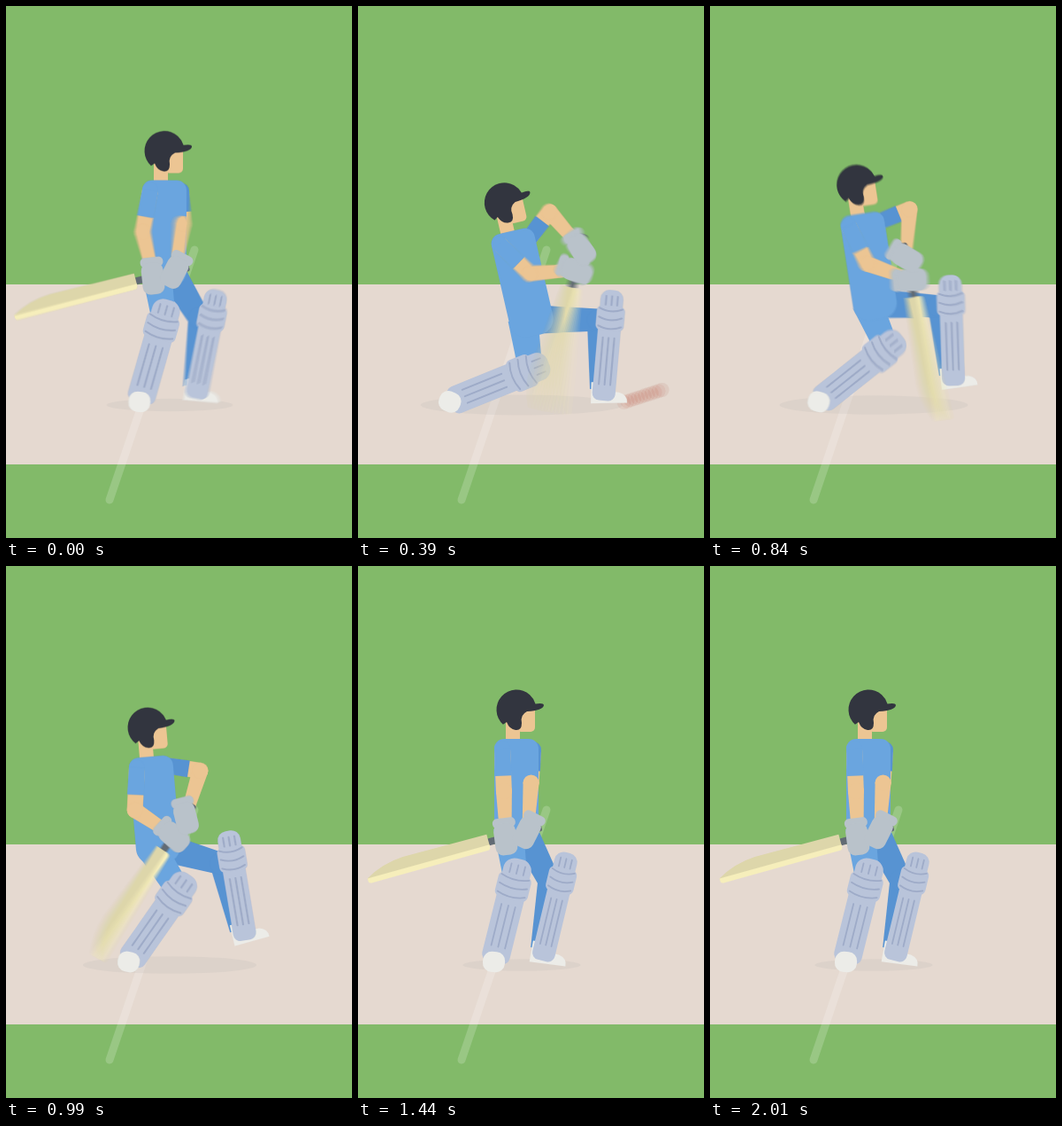
Animation, 391 px wide and 600 px high, one loop 2250 ms. Source, as an HTML page with a canvas:

```html
<!DOCTYPE html>
<html lang="en">
<head>
<meta charset="utf-8">
<title>Batsman</title>
<style>
html, body { margin: 0; width: 100%; height: 100%; overflow: hidden; background: #82ba69; }
canvas { display: block; width: 391px; height: 600px; }
</style>
</head>
<body>
<canvas id="stage" width="391" height="600"></canvas>
<script>
const ctx = document.getElementById('stage').getContext('2d');
const sum = document.createElement('canvas');
sum.width = 391;
sum.height = 600;
const ink = sum.getContext('2d');

const LOOP = 2250, STEP = 30, SHUTTER = 18, SAMPLES = 12, REST = 1400;
const RAD = Math.PI / 180;
const TORSO = 121, NEAR_PAD = 120, FAR_PAD = 125, BLADE = 143;
const C = {
  grass: '#82ba69', pitch: '#e5d9d0', shirt: '#6aa5df', shade: '#5793d2',
  skin: '#ecc593', helmet: '#32353f', glove: '#b9c2ca', pad: '#b9c4da',
  seam: '#9eabc8', shoe: '#ecece8', blade: '#ddd6aa', edge: '#f6eebb',
  grip: '#626b74', ball: '#ba503d'
};

// Smooth monotone curve through rows of [time, values...], at rest at both ends
function curve(rows) {
  const last = rows.length - 1;
  const slope = (i, d) => (rows[i + 1][d] - rows[i][d]) / (rows[i + 1][0] - rows[i][0]);
  function tangent(i, d) {
    if (i === 0 || i === last) return 0;
    const a = slope(i - 1, d), b = slope(i, d);
    return a * b <= 0 ? 0 : 2 * a * b / (a + b);
  }
  return t => {
    const time = Math.max(rows[0][0], Math.min(rows[last][0], t));
    let i = 0;
    while (i < last - 1 && time > rows[i + 1][0]) i++;
    const h = rows[i + 1][0] - rows[i][0], u = (time - rows[i][0]) / h, v = 1 - u;
    return rows[i].slice(1).map((from, k) => {
      const d = k + 1, to = rows[i + 1][d];
      return v * v * (1 + 2 * u) * from + u * u * (3 - 2 * u) * to +
        h * u * v * (v * tangent(i, d) - u * tangent(i + 1, d));
    });
  };
}

// Neck x, y, tilt; lower hand x, y; near foot x, shin lean; far foot x, y, shin lean
const stance = [179, 196, 0, 167, 306, 154, 14, 208, 445, 13.5];
const poseAt = curve([
  [-40, ...stance],
  [180, 179, 222, 1, 160, 298, 117, 44, 280, 419, -12.5],
  [390, 173, 255, -13, 246, 298, 104, 68, 277, 445, 5],
  [630, 184, 258, -13, 277, 316, 104, 70, 278, 441, 10.5],
  [990, 163, 216, -5, 189, 304, 139, 35, 271, 422, -9.5],
  [REST, ...stance]
]);
const batAt = curve([[-40, 164.5], [180, 182], [260, 190], [390, 103], [450, 46],
  [630, 43.5], [990, 123.5], [1080, 160], [1300, 164.5]]);

const move = (o, deg, x, y) => {
  const c = Math.cos(deg * RAD), s = Math.sin(deg * RAD);
  return [o[0] + x * c - y * s, o[1] + x * s + y * c];
};
const mix = (a, b, k) => [a[0] + (b[0] - a[0]) * k, a[1] + (b[1] - a[1]) * k];

// Middle joint of a two-part limb; side picks the way it bends
function joint(a, b, la, lb, side) {
  const d = Math.hypot(b[0] - a[0], b[1] - a[1]);
  const along = d < la + lb ? (la * la - lb * lb + d * d) / (2 * d) : d * la / (la + lb);
  const out = Math.sqrt(Math.max(0, la * la - along * along)) * (d < la + lb ? side : 0);
  return move(a, Math.atan2(b[1] - a[1], b[0] - a[0]) / RAD, along, out);
}

function place([x, y], deg, draw) {
  ctx.save();
  ctx.translate(x, y);
  ctx.rotate(deg * RAD);
  draw();
  ctx.restore();
}

function box(x, y, w, h, r, color) {
  ctx.beginPath();
  ctx.roundRect(x, y, w, h, r);
  ctx.fillStyle = color;
  ctx.fill();
}

function oval(x, y, rx, ry, color) {
  ctx.beginPath();
  ctx.ellipse(x, y, rx, ry, 0, 0, 2 * Math.PI);
  ctx.fillStyle = color;
  ctx.fill();
}

// Tapered bar from a to b
function limb(a, b, wa, wb, color) {
  const len = Math.hypot(b[0] - a[0], b[1] - a[1]);
  place(a, Math.atan2(b[1] - a[1], b[0] - a[0]) / RAD, () => {
    ctx.beginPath();
    ctx.moveTo(0, -wa / 2);
    ctx.lineTo(len, -wb / 2);
    ctx.lineTo(len, wb / 2);
    ctx.lineTo(0, wa / 2);
    ctx.fillStyle = color;
    ctx.fill();
  });
}

function upperArm(shoulder, elbow, color) {
  limb(shoulder, elbow, 18, 18, C.skin);
  oval(...elbow, 9, 9, C.skin);
  oval(...shoulder, 9, 9, color);
  limb(shoulder, mix(shoulder, elbow, 0.64), 18, 19, color);
}

function foreArm(elbow, hand) {
  limb(elbow, hand, 18, 13, C.skin);
  oval(...elbow, 9, 9, C.skin);
}

function field() {
  ctx.fillStyle = C.grass;
  ctx.fillRect(0, 0, 391, 600);
  ctx.fillStyle = C.pitch;
  ctx.fillRect(0, 314, 391, 203);
  ctx.strokeStyle = 'rgba(255,255,255,.18)';
  ctx.lineWidth = 9;
  ctx.lineCap = 'round';
  ctx.beginPath();
  ctx.moveTo(213, 275);
  ctx.lineTo(117, 557);
  ctx.stroke();
}

function head() {
  box(-12, 10, 16, 30, 2, C.skin);
  box(0, -4, 21, 29, 5, C.skin);
  ctx.beginPath();
  ctx.arc(0, 0, 22.5, 132 * RAD, -17 * RAD);
  ctx.quadraticCurveTo(31, -8, 31, -5);
  ctx.quadraticCurveTo(30, 1, 12, 2);
  ctx.quadraticCurveTo(4, 6, 6, 15);
  ctx.quadraticCurveTo(6, 24, -1, 23);
  ctx.quadraticCurveTo(-8, 22, -11, 14);
  ctx.closePath();
  ctx.fillStyle = C.helmet;
  ctx.fill();
}

// Shin pad, foot end at the origin, pointing up
function pad(len, half) {
  const top = -len, roll = top + 18;
  box(-half, top, 2 * half, len, [half * 0.8, half * 0.8, 8, 8], C.pad);
  box(-half - 3, roll, 2 * half + 6, 28, 6, C.pad);
  ctx.strokeStyle = C.seam;
  ctx.lineWidth = 1.8;
  ctx.lineCap = 'round';
  ctx.beginPath();
  for (let i = 0; i < 3; i++) {
    const y = roll + 3 + 10 * i, x = (i - 1) * half / 2;
    ctx.moveTo(-half, y);
    ctx.quadraticCurveTo(0, y + 6, half, y);
    ctx.moveTo(x, top + 7);
    ctx.lineTo(x, top + 17);
    ctx.moveTo(x, top + 54);
    ctx.lineTo(x, -18);
  }
  ctx.stroke();
}

function farShoe() {
  ctx.beginPath();
  ctx.moveTo(-14, 3);
  ctx.lineTo(-13, -21);
  ctx.lineTo(-4, -21);
  ctx.quadraticCurveTo(4, -9, 18, -9);
  ctx.quadraticCurveTo(28, -6, 27, 3);
  ctx.closePath();
  ctx.fillStyle = C.shoe;
  ctx.fill();
}

function glove() {
  box(-22, -13, 11, 26, 5, C.glove);
  box(-16, -12, 36, 25, 9, C.glove);
}

// Bat lying along x, gripped at the origin by the lower hand
function bat() {
  const start = 20, end = start + BLADE;
  box(-42, -4, start + 44, 8, 2, C.grip);
  ctx.fillStyle = C.blade;
  ctx.beginPath();
  ctx.moveTo(start, -5);
  ctx.lineTo(start, 9);
  ctx.lineTo(end - 45, 10);
  ctx.quadraticCurveTo(end - 20, 9, end, -3);
  ctx.lineTo(end, -5);
  ctx.fill();
  box(start, -9, BLADE, 6, [4, 3, 0, 0], C.edge);
}

function ball(t) {
  const dt = t - 410;
  if (Math.abs(dt) > 70) return;
  oval(270 + 2.6 * Math.abs(dt), 457 + (dt < 0 ? 0.85 : 1.4) * dt, 8, 8, C.ball);
}

function scene(t) {
  const [nx, ny, tilt, gx, gy, nearX, nearLean, farX, farY, farLean] = poseAt(t);
  const [swing] = batAt(t);
  const neck = [nx, ny], nearFoot = [nearX, 447], farFoot = [farX, farY];
  const body = (x, y) => move(neck, tilt, x, y);
  const nearKnee = move(nearFoot, nearLean, 0, 22 - NEAR_PAD);
  const farKnee = move(farFoot, farLean, -14, 35 - FAR_PAD);
  const farAnkle = move(farFoot, farLean, -9, -12);

  // both hands ride on the handle and the elbows follow
  const nearHand = [gx, gy], farHand = move(nearHand, swing, -26, 0);
  const nearShoulder = body(-16, 10), farShoulder = body(19, 11);
  const nearElbow = joint(nearShoulder, nearHand, 48, 52, 1);
  const farElbow = joint(farShoulder, farHand, 37, 54, -1);

  field();
  const spread = 45 + 0.4 * (farX - nearX);
  oval(185, 450, spread, spread * 0.1, 'rgba(160,165,165,.13)');
  ball(t);

  limb(farKnee, farAnkle, 24, 14, C.shade);
  limb(body(8, TORSO - 18), farKnee, 32, 25, C.shade);
  oval(...farKnee, 12, 12, C.shade);
  place(farFoot, farLean - 6, farShoe);
  place(farFoot, farLean, () => pad(FAR_PAD, 13));

  upperArm(farShoulder, farElbow, C.shade);
  place(body(0, -34), tilt, head);
  limb(body(-9, TORSO - 22), nearKnee, 34, 27, C.shirt);
  place(neck, tilt, () => box(-25, -1, 50, TORSO, [11, 11, 18, 18], C.shirt));

  place(nearFoot, nearLean, () => pad(NEAR_PAD, 16));
  place(nearFoot, nearLean / 3, () => box(-13, -12, 25, 23, 10, C.shoe));

  upperArm(nearShoulder, nearElbow, C.shirt);
  foreArm(nearElbow, nearHand);
  foreArm(farElbow, farHand);
  place(nearHand, swing, bat);
  place(nearHand, swing - 82, glove);
  place(farHand, swing - 48, glove);
}

// Motion blur: running average of moments within the open shutter
function render(t) {
  if (t > REST + SHUTTER) return scene(t);
  for (let i = 0; i < SAMPLES; i++) {
    scene(t + SHUTTER * ((i + 0.5) / SAMPLES - 0.5));
    ink.globalAlpha = 1 / (i + 1);
    ink.drawImage(ctx.canvas, 0, 0);
  }
  ctx.drawImage(sum, 0, 0);
}

const start = performance.now();
let shown = -1;
function tick() {
  const t = Math.floor((performance.now() - start) % LOOP / STEP) * STEP;
  if (t !== shown) render(shown = t);
  requestAnimationFrame(tick);
}
tick();
</script>
</body>
</html>
```
